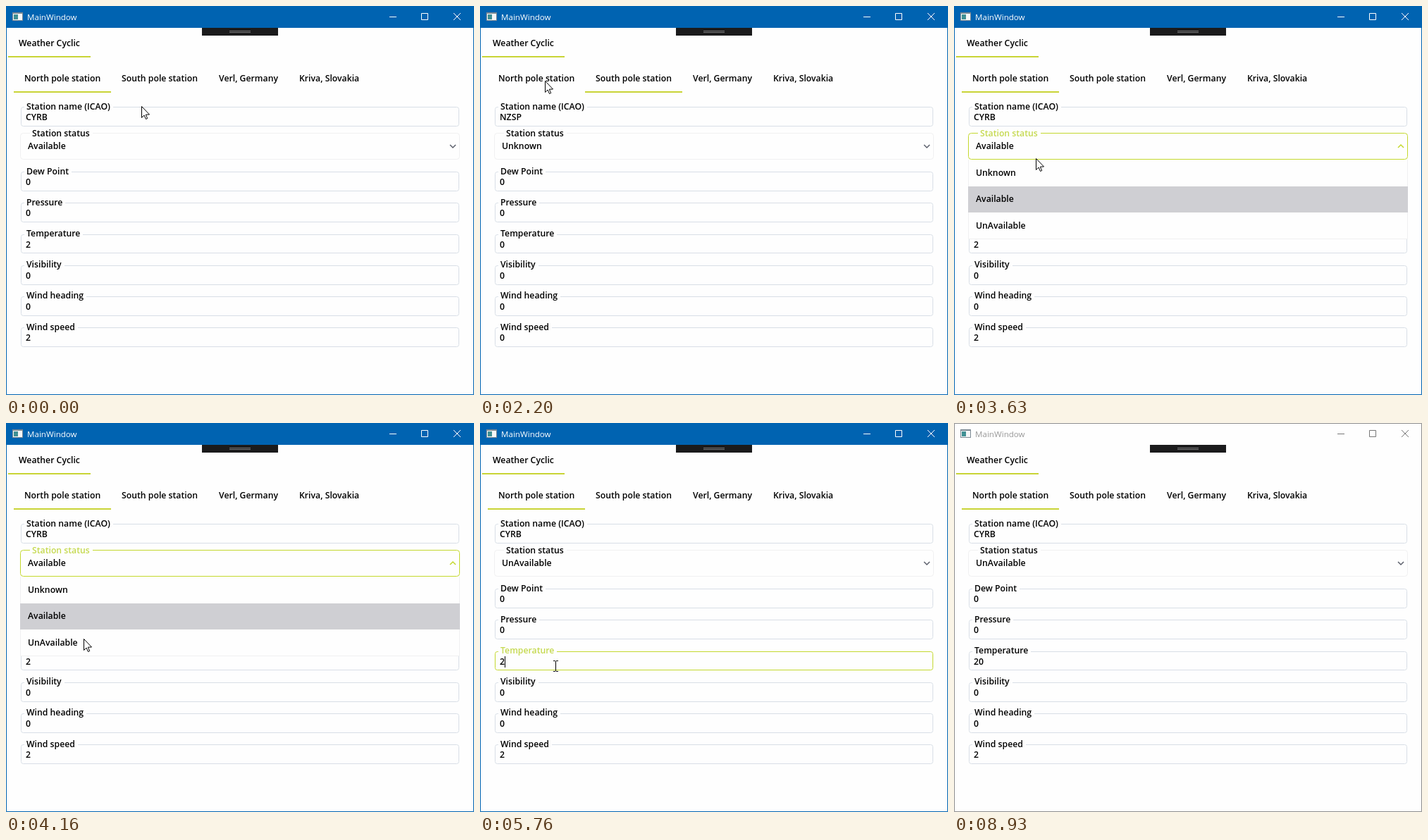
Recreate the animation shown at these times as an HTML page with a canvas. Size 664 px wide and 552 px high, loop 9.03 s.

```html
<!DOCTYPE html>
<html lang="en">
<head>
<meta charset="utf-8">
<title>Weather Cyclic</title>
<style>
  html, body { margin: 0; width: 100%; height: 100%; overflow: hidden; background: #fefefe; }
  canvas { display: block; }
</style>
</head>
<body>
<canvas id="stage" width="664" height="552"></canvas>
<script>
const ctx = document.getElementById('stage').getContext('2d');
const LOOP = 9030;
const PAGE = '#fefefe', BLUE = '#0063b1', LIME = '#c4d82e', LINE = '#d8dee6', FAINT = '#f0f0f1';
const UNDERLINE = '#c9d436', ACTIVE_LABEL = '#c5d94f';
const TEXT = '600 12.25px "Open Sans", "Noto Sans", sans-serif';
const TITLE = '11.6px "Open Sans", "Noto Sans", sans-serif';

// Moments of the session
const SHOW_VERL = 830, SHOW_SOUTH = 1500, SHOW_NORTH = 2230;
const EDIT_NAME = 2700, OPEN = 3300, CHOOSE = 4930, EDIT_TEMP = 5760, TYPE = 6960, LEAVE = 8930;
const BLINK = 530;

// Pointer moves: start, end, x, y
const moves = [
  [0, 230, 324, 114], [430, 630, 327, 106], [900, 1360, 221, 102], [1560, 2050, 92, 106],
  [2210, 2480, 112, 161], [2840, 3130, 118, 193], [3400, 4200, 110, 307], [4200, 4360, 108, 314],
  [5080, 5560, 107, 345], [6110, 6160, 107, 336], [7420, 7660, 92, 398], [7660, 8330, 192, 541],
  [8330, 8400, 238, 560]
];

const tabNames = ['North pole station', 'South pole station', 'Verl, Germany', 'Kriva, Slovakia'];
const codes = ['CYRB', 'NZSP', 'EDLP'];
const states = ['Unknown', 'Available', 'UnAvailable'];
const fields = ['Station name (ICAO)', 'Dew Point', 'Pressure', 'Temperature', 'Visibility', 'Wind heading', 'Wind speed']
  .map((label, i) => ({ label, y: i ? 191.1 + 44.15 * i : 143 }));
const NAME = 0, TEMPERATURE = 3, WIND_SPEED = 6;

const within = (v, a, b) => v >= a && v < b;
const clamp = v => Math.max(0, Math.min(1, v));
const easeOut = v => Math.sin(clamp(v) * Math.PI / 2);
const smooth = v => v * v * (3 - 2 * v);

function rect(x, y, w, h, color) {
  ctx.fillStyle = color;
  ctx.fillRect(x, y, w, h);
}

function text(s, x, y, color = '#000', font = TEXT) {
  ctx.font = font;
  ctx.fillStyle = color;
  ctx.fillText(s, x, y);
}

function line(points, color, width = 1, fill) {
  ctx.beginPath();
  points.forEach(([x, y]) => ctx.lineTo(x, y));
  if (fill) {
    ctx.closePath();
    ctx.fillStyle = fill;
    ctx.fill();
  }
  ctx.strokeStyle = color;
  ctx.lineWidth = width;
  ctx.stroke();
}

function box(x, y, w, h, color, radius = 0) {
  ctx.beginPath();
  ctx.roundRect(x + .5, y + .5, w - 1, h - 1, radius);
  ctx.strokeStyle = color;
  ctx.lineWidth = 1;
  ctx.stroke();
}

function textWidth(s) {
  ctx.font = TEXT;
  return Math.round(ctx.measureText(s).width);
}

// Label that interrupts the top border at y
function borderLabel(label, x, y, base, color) {
  rect(x - 3, y - 1, textWidth(label) + 7, 3, PAGE);
  text(label, x, base, color);
}

function pointerAt(t) {
  let x = 192, y = 142;
  for (const [start, end, toX, toY] of moves) {
    const k = smooth(clamp((t - start) / (end - start)));
    x += (toX - x) * k;
    y += (toY - y) * k;
  }
  return { x: Math.round(x), y: Math.round(y) };
}

function drawWindow(active) {
  const ink = active ? '#fff' : '#777';
  rect(0, 0, 664, 552, PAGE);
  if (active) rect(0, 0, 664, 31, BLUE);
  box(0, 0, 664, 552, active ? BLUE : '#8c8c8c');
  rect(9, 9, 15, 12, '#7d8a94');
  rect(10, 11, 13, 9, '#f4f6f7');
  rect(11, 12, 6, 7, '#3f8f93');
  text('MainWindow', 30, 20, active ? '#fff' : '#999', TITLE);
  line([[544, 15.5], [554, 15.5]], ink);
  box(589, 10, 10, 10, ink);
  line([[635, 10], [645, 20]], ink);
  line([[645, 10], [635, 20]], ink);
  rect(278, 31, 108, 11, '#1b1b1c');
  for (const y of [35, 37]) rect(317, y, 30, 1, '#777');
}

function drawTabs(t, selected, clicked) {
  text('Weather Cyclic', 18, 57);
  rect(3, 71, 117, 2, UNDERLINE);
  let left = 11;
  tabNames.forEach((name, i) => {
    const w = textWidth(name) + 30;
    text(name, left + 15, 107);
    if (i === selected) {
      const grown = w * easeOut((t - clicked) / 300);
      rect(left + (w - grown) / 2, 121, grown, 2, UNDERLINE);
    }
    left += w;
  });
}

function drawField({ label, y }, value, hot, focused, caret) {
  const top = Math.round(y), bottom = Math.floor(y + 28.4);
  box(21, top, 622, bottom - top, hot || focused ? LIME : LINE, 3);
  borderLabel(label, 29, top, Math.floor(y) + 4, focused ? ACTIVE_LABEL : '#000');
  text(value, 28, top + 19);
  if (caret) rect(28 + textWidth(value), top + 7, 1, 16, '#000');
}

function drawStatus(value, hot, open) {
  box(20, 180, 624, 38, hot || open ? LIME : FAINT, 4);
  borderLabel('Station status', 37, 180, 185, open ? ACTIVE_LABEL : '#000');
  text(value, 31, 203);
  const [mid, end] = open ? [197, 201] : [201, 197];
  line([[630, end], [634, mid], [638, end]], open ? LIME : '#5b5f6b', 1.5);
}

function drawPopup(t) {
  if (t < OPEN) return;
  ctx.save();
  ctx.globalAlpha = 1 - clamp((t - CHOOSE) / 150);
  ctx.beginPath();
  ctx.rect(20, 218, 624, 113 * easeOut((t - OPEN + 30) / 200));
  ctx.clip();
  rect(20, 218, 624, 113, PAGE);
  box(20, 217, 624, 114, FAINT);
  rect(20, 256, 624, 37, '#cfcfd3');
  states.forEach((s, i) => text(s, 31, Math.floor(241 + 37.5 * i)));
  ctx.restore();
}

function drawPointer({ x, y }, beam) {
  ctx.save();
  ctx.translate(x, y);
  if (beam) {
    rect(0, -7, 1, 14, '#000');
    for (const v of [-8, 7]) {
      rect(-3, v, 3, 1, '#000');
      rect(1, v, 3, 1, '#000');
    }
  } else {
    line([[.5, .5], [.5, 16.5], [4, 13], [6.5, 18.5], [8.7, 17.5], [6.3, 12.2], [11.5, 12]], '#000', 1, '#fff');
  }
  ctx.restore();
}

function selection(t) {
  if (t >= SHOW_NORTH) return [0, SHOW_NORTH];
  if (t >= SHOW_SOUTH) return [1, SHOW_SOUTH];
  return t >= SHOW_VERL ? [2, SHOW_VERL] : [0, -LOOP];
}

function valueOf(field, station, t) {
  if (field === NAME) return codes[station];
  if (station === 0 && field === TEMPERATURE) return t < TYPE ? '2' : '20';
  return station === 0 && field === WIND_SPEED ? '2' : '0';
}

function draw(t) {
  const pointer = pointerAt(t);
  const [station, clicked] = selection(t);
  const open = within(t, OPEN, CHOOSE);
  const focus = within(t, EDIT_NAME, OPEN) ? NAME : within(t, EDIT_TEMP, LEAVE) ? TEMPERATURE : -1;
  const lastInput = [TYPE, EDIT_TEMP, EDIT_NAME].find(start => t >= start);
  const caret = Math.floor((t - lastInput) / BLINK) % 2 === 0;
  const over = (f, h) => !open && within(pointer.y, Math.round(f.y), Math.round(f.y) + h);

  drawWindow(t < LEAVE);
  drawTabs(t, station, clicked);
  fields.forEach((f, i) =>
    drawField(f, valueOf(i, station, t), over(f, 31), focus === i, focus === i && caret));
  drawStatus(states[station ? 0 : t < CHOOSE ? 1 : 2], within(pointer.y, 180, 218), open);
  drawPopup(t);
  drawPointer(pointer, fields.some(f => over(f, 28)));
}

function tick() {
  draw(performance.now() % LOOP);
  requestAnimationFrame(tick);
}
tick();
</script>
</body>
</html>
```
